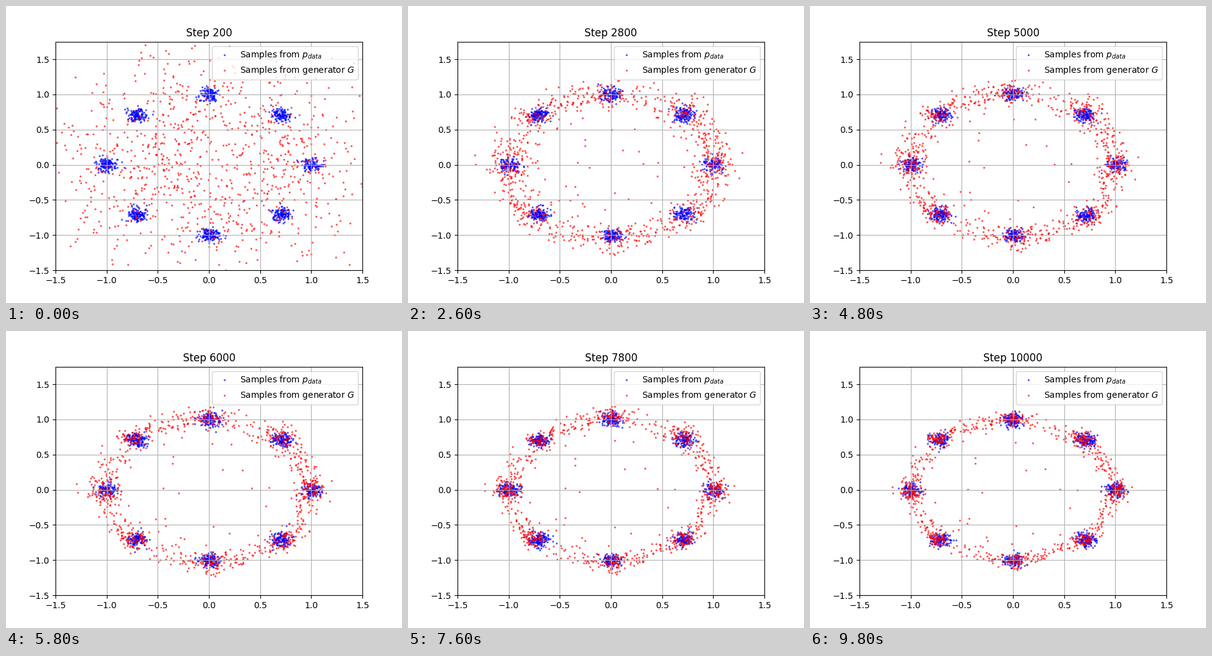
Write a matplotlib script that moves like this. It is 640 px wide and 480 px high and loops after 10000 ms.

```python
import numpy as np
import matplotlib.pyplot as plt
from matplotlib.animation import FuncAnimation

FRAMES, INTERVAL, STEP = 50, 200, 200
COUNT = 1000
TAU = 2 * np.pi
MODES = np.arange(8) * TAU / 8
FORMING = 6  # frames until the cloud has opened into a ring

rng = np.random.default_rng(4)
dist = np.sqrt(-2 * np.log(rng.uniform(size=COUNT)))
angle = rng.uniform(-np.pi, np.pi, COUNT)
radial, angular = rng.normal(size=(2, COUNT))


def polar(r, a):
    return np.column_stack([r * np.cos(a), r * np.sin(a)])


cloud = polar(0.85 * dist ** 0.8, angle)


def real_samples(i):
    r = np.random.default_rng(100 + i)
    return polar(1, MODES[r.integers(0, 8, COUNT)]) + r.normal(0, 0.05, (COUNT, 2))


def ring(i):
    """Ring that starts boxy and lopsided, then gathers at the eight modes."""
    p = i / (FRAMES - 1)
    fade = np.exp(-i / FORMING)
    spread = 0.11 - 0.06 * p
    bunch = 0.95 * np.sin(np.pi / 2 * p) ** 1.3
    hole = 0.18 + 0.7 * fade
    drift = np.random.default_rng(500 + i).normal(0, 0.018, (2, 8))

    a = angle - 0.55 * fade * np.sin(2 * angle - 0.5)
    a = a - bunch / 8 * np.sin(8 * a) + 0.7 * spread * angular
    a = a + np.interp(a, MODES, drift[0], period=TAU)

    r = 1.06 - 0.04 * p + np.interp(a, MODES, drift[1], period=TAU)
    r = r - 0.12 * fade * np.cos(4 * a)
    r = r - 0.025 * bunch * (1 - np.cos(8 * a))
    return polar((r + spread * radial) * np.tanh(dist / hole), a)


def fake_samples(i):
    mix = 1 - (1 - min(i / FORMING, 1)) ** 2
    return (1 - mix) * cloud + mix * ring(i)


fig, ax = plt.subplots(figsize=(6.4, 4.8), dpi=100)
ax.set(xlim=(-1.5, 1.5), ylim=(-1.5, 1.75))
ax.grid(True)


def dots(color, label):
    return ax.scatter([], [], s=2, c=color, alpha=0.5, label=label)


real = dots("blue", "Samples from $p_{data}$")
fake = dots("red", "Samples from generator $G$")
ax.legend(loc="upper right")
title = ax.set_title("")


def draw(i):
    real.set_offsets(real_samples(i))
    fake.set_offsets(fake_samples(i))
    title.set_text(f"Step {(i + 1) * STEP}")
    return real, fake, title


anim = FuncAnimation(fig, draw, frames=FRAMES, init_func=lambda: draw(0),
                     interval=INTERVAL, repeat=True, repeat_delay=0)
plt.show()
```
